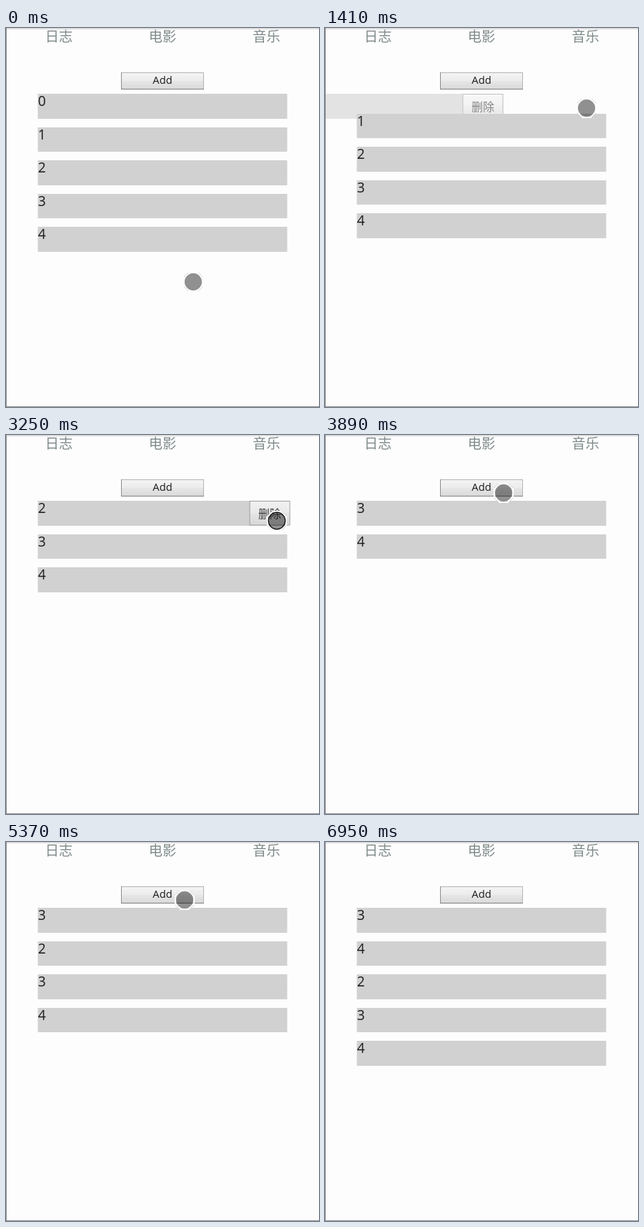
Recreate the animation shown at these times as an HTML page. Size 438 by 530 pixels, loop 7.38 s.

```html
<!DOCTYPE html>
<html lang="zh-CN">
<head>
<meta charset="utf-8">
<title>List transitions</title>
<style>
  html, body { margin: 0; width: 100%; height: 100%; overflow: hidden; background: #fdfdfd; }
  svg { display: block; }
  text { font-family: "Open Sans", "Noto Sans", sans-serif; fill: #1c1c1c; }
  .tab, .del { font-family: "Noto Sans CJK SC", "Noto Sans CJK", sans-serif; text-anchor: middle; }
  .tab { font-size: 19.3px; fill: #7f8a8a; }
  .del { font-size: 16px; fill: #333; }
  .add { font-size: 14.7px; text-anchor: middle; }
  .num { font-size: 19.2px; }
</style>
</head>
<body>
<svg id="stage" width="438" height="530" viewBox="0 0 438 530">
  <defs>
    <linearGradient id="face" x1="0" y1="0" x2="0" y2="1">
      <stop offset="0" stop-color="#f4f4f4"/>
      <stop offset=".48" stop-color="#ececec"/>
      <stop offset=".52" stop-color="#e6e6e6"/>
      <stop offset="1" stop-color="#d9d9d9"/>
    </linearGradient>
    <linearGradient id="down" x1="0" y1="0" x2="0" y2="1">
      <stop offset="0" stop-color="#d8d8d8"/>
      <stop offset="1" stop-color="#e6e6e6"/>
    </linearGradient>
  </defs>
  <rect width="438" height="530" fill="#fdfdfd"/>
  <text class="tab" x="74" y="19">日志</text>
  <text class="tab" x="219" y="19">电影</text>
  <text class="tab" x="364.5" y="19">音乐</text>
  <g>
    <rect id="add" x="161.5" y="62.5" width="115" height="23" fill="url(#face)" stroke="#b4b4b4"/>
    <path d="M161.5 62V86" stroke="#8c8c8c"/>
    <path d="M161 85.5H277" stroke="#808080"/>
    <text class="add" x="219" y="78">Add</text>
  </g>
  <g id="rows"></g>
  <path d="M0 1H438" stroke="#d4d4d4" stroke-width="1.4"/>
  <path d="M.5 0V530M0 529.5H438" stroke="#8e8e8e"/>
  <g id="cursor">
    <path d="M-6-13H6L13-6V6L6 13H-6L-13 6V-6Z" fill="none" stroke="#fff" stroke-width="2"/>
    <path d="M-13-7L-7-13M7-13L13-7M13 7L7 13M-7 13L-13 7" stroke="#c4c4c4" stroke-dasharray="2 1.2"/>
    <circle id="dot" r="11.7" fill="#000" fill-opacity=".43"/>
  </g>
</svg>
<script>
const LOOP = 7380, DUR = 500;
const LEFT = 44.5, WIDTH = 349, TOP = 92.4, PITCH = 46.5, HEIGHT = 34.4, BTN = 57;
const $ = id => document.getElementById(id);

// time, action, row index, label
const EVENTS = [
  [645, 'hover', 0], [1285, 'drop', 0],
  [1460, 'hover', 0], [2412, 'drop', 0],
  [2915, 'hover', 0], [3370, 'drop', 0],
  [4020, 'add', 0, 2], [4860, 'add', 0, 3], [5735, 'add', 1, 4]
];
const PRESSES = [[1190, 1285], [2330, 2412], [3200, 3370], [3940, 4020], [4790, 4860], [5620, 5735]];
// time, x, y of the pointer
const PATH = [
  [0, 262, 355], [60, 262, 355], [640, 347, 122], [820, 362, 113], [1100, 366, 112],
  [1580, 366, 112], [2200, 377, 115], [2500, 377, 115], [3050, 379, 120],
  [3400, 379, 120], [3800, 250, 82], [3900, 250, 81], [6570, 250, 81], [6950, 386, 481]
];

// cubic-bezier(.25, .1, .25, 1)
function ease(x) {
  if (x <= 0) return 0;
  if (x >= 1) return 1;
  const bez = (a, b, s) => 3 * a * s * (1 - s) ** 2 + 3 * b * s * s * (1 - s) + s ** 3;
  let lo = 0, hi = 1;
  for (let i = 0; i < 24; i++) {
    const mid = (lo + hi) / 2;
    if (bez(.25, .25, mid) < x) lo = mid; else hi = mid;
  }
  return bez(.1, 1, lo);
}
const since = (t, start) => ease((t - start) / DUR);
const slot = (row, t) => row.from + (row.to - row.from) * since(t, row.start);
const newRow = (label, pos) =>
  ({ label, from: pos, to: pos, start: -DUR, born: -DUR, gone: Infinity, button: Infinity });

function rowsAt(t) {
  let rows = [0, 1, 2, 3, 4].map(i => newRow(i, i));
  for (const [time, action, index, label] of EVENTS) {
    if (time > t) break;
    rows = rows.filter(r => r.gone === Infinity);
    if (action === 'hover') rows[index].button = time;
    if (action === 'drop') rows[index].gone = time;
    if (action === 'add') {
      const row = newRow(label, index);
      row.born = time;
      rows.splice(index, 0, row);
    }
    let pos = 0;
    for (const row of rows) {
      if (row.gone < Infinity) continue;
      const target = pos++;
      if (row.born === time) continue;
      row.from = slot(row, time);
      row.to = target;
      row.start = time;
    }
  }
  return rows.filter(r => t < r.gone + DUR);
}

const pool = Array.from({ length: 6 }, () => {
  const g = document.createElementNS('http://www.w3.org/2000/svg', 'g');
  g.innerHTML = `<rect width="${WIDTH}" fill="#d1d1d1"/>
    <text class="num" x=".3" y="16.5"></text>
    <g><rect x=".5" y=".5" width="${BTN - 1}" height="33.5" fill="url(#face)" stroke="#9a9a9a"/>
    <text class="del" x="${BTN / 2}" y="23.5">删除</text></g>`;
  $('rows').append(g);
  const [box, num, btn] = g.children;
  return { g, box, num, btn };
});

function drawRow(view, row, t) {
  view.g.style.display = row ? '' : 'none';
  if (!row) return;
  const shown = since(t, row.born) * (1 - since(t, row.gone));
  const y = TOP + PITCH * slot(row, t), top = Math.round(y);
  view.g.setAttribute('transform', `translate(${LEFT - WIDTH * (1 - shown)} ${top})`);
  view.g.setAttribute('opacity', shown);
  view.box.setAttribute('height', Math.round(y + HEIGHT) - top);
  view.num.textContent = row.label;
  const slide = since(t, row.button);
  view.btn.setAttribute('opacity', slide);
  view.btn.setAttribute('transform', `translate(${WIDTH - BTN * slide} 0)`);
}

function drawCursor(t) {
  const last = PATH[PATH.length - 1];
  $('cursor').style.display = t < last[0] ? '' : 'none';
  if (t >= last[0]) return;
  const i = PATH.findIndex(p => p[0] > t);
  const [t0, x0, y0] = PATH[i - 1], [t1, x1, y1] = PATH[i];
  const u = (t - t0) / (t1 - t0), k = u * u * (3 - 2 * u);
  $('cursor').setAttribute('transform', `translate(${x0 + (x1 - x0) * k} ${y0 + (y1 - y0) * k})`);
  const pressed = PRESSES.some(([a, b]) => t >= a && t < b);
  $('dot').setAttribute('stroke', pressed ? '#111' : '#808080');
  $('dot').setAttribute('stroke-width', pressed ? 1.4 : .7);
  $('add').setAttribute('fill', pressed && t > 3800 ? 'url(#down)' : 'url(#face)');
}

function render(t) {
  const rows = rowsAt(t);
  pool.forEach((view, i) => drawRow(view, rows[i], t));
  drawCursor(t);
}

const begin = performance.now();
function tick() {
  render((performance.now() - begin) % LOOP);
  requestAnimationFrame(tick);
}
tick();
</script>
</body>
</html>
```
